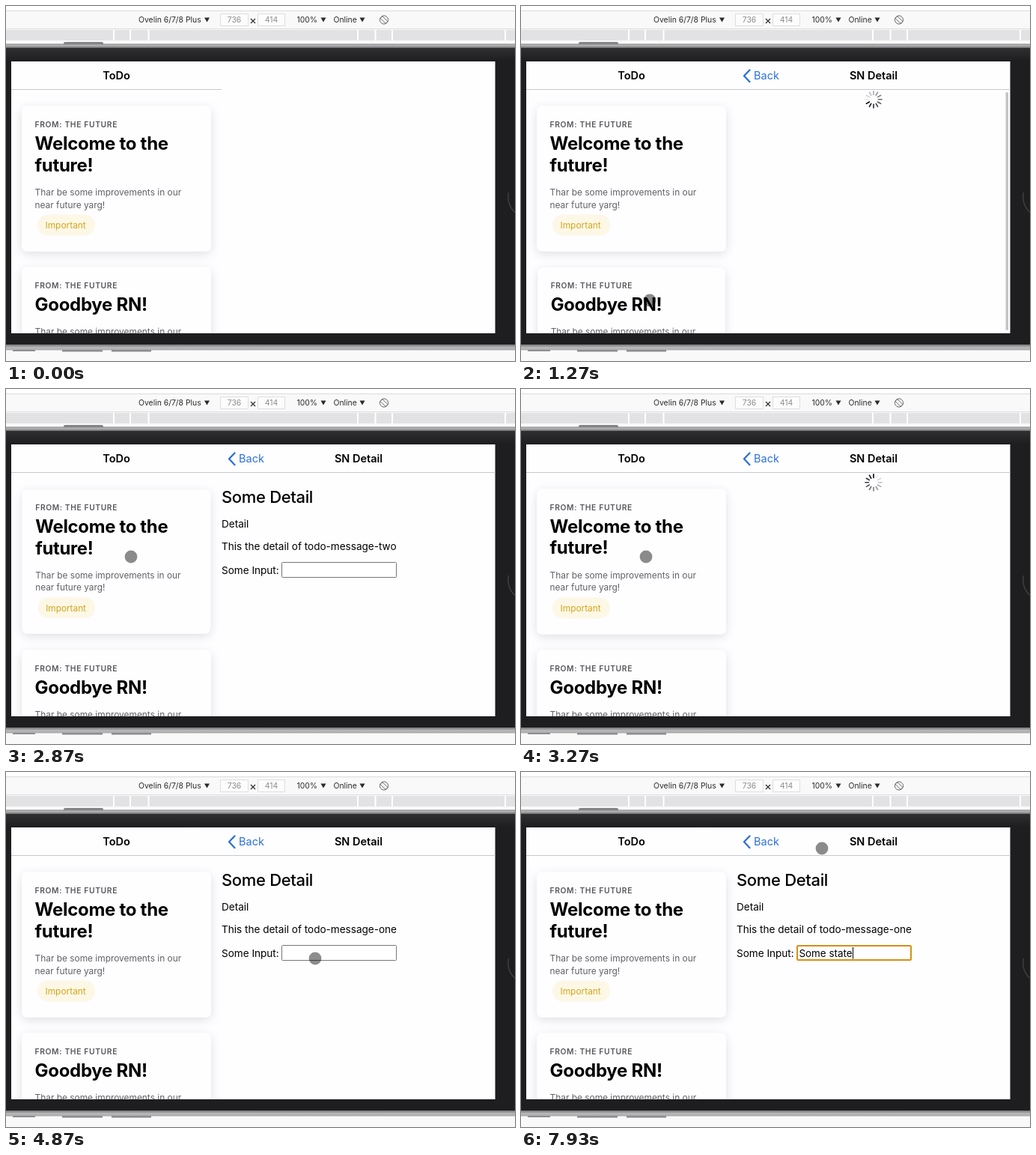
These frames come from a looping animation (680 px wide and 474 px high, 8 s). An HTML page:

```html
<!DOCTYPE html>
<html lang="en">
<head>
<meta charset="utf-8">
<title>ToDo split view</title>
<style>
html, body { margin: 0; width: 100%; height: 100%; overflow: hidden; background: #f9f9f9; }
svg { display: block; width: 680px; height: 474px; }
text { font-family: Inter, Roboto, sans-serif; font-optical-sizing: none; white-space: pre; }
.bar { font-size: 10.4px; fill: #2b2b2b; }
.dim { fill: #8c8c8c; text-anchor: middle; }
.nav { font-size: 14.5px; font-weight: 600; text-anchor: middle; }
.back { font-size: 14.5px; fill: #2b70dc; }
.from { font-size: 10.3px; font-weight: 600; letter-spacing: .64px; fill: #57575a; }
.title { font-size: 24px; font-weight: 700; letter-spacing: -.28px; }
.body { font-size: 11.9px; fill: #626264; }
.chip { font-size: 11.9px; fill: #d3a51d; }
.head { font-size: 22px; font-weight: 500; letter-spacing: -.34px; }
.copy { font-size: 13.55px; }
.typed { font-size: 13.4px; }
</style>
</head>
<body>
<svg viewBox="0 0 680 474">
  <defs>
    <filter id="shadow" x="-20%" y="-20%" width="140%" height="145%">
      <feDropShadow dx="0" dy="3.5" stdDeviation="6.5" flood-opacity=".12"/>
    </filter>
    <linearGradient id="topEdge" x2="0" y2="1">
      <stop offset="0" stop-color="#858587"/><stop offset=".4" stop-color="#b4b4b6"/><stop offset="1" stop-color="#808082"/>
    </linearGradient>
    <linearGradient id="bezel" x2="0" y2="1">
      <stop offset="0" stop-color="#303032"/><stop offset=".045" stop-color="#1e1e20"/><stop offset="1" stop-color="#1e1e20"/>
    </linearGradient>
    <linearGradient id="bottomEdge" x2="0" y2="1">
      <stop offset="0" stop-color="#78787a"/><stop offset=".5" stop-color="#bcbcbe"/><stop offset="1" stop-color="#a4a4a6"/>
    </linearGradient>
    <clipPath id="screen"><rect x="7" y="74" width="646.5" height="363"/></clipPath>
  </defs>

  <rect width="680" height="474" fill="#f9f9f9"/>
  <rect width="680" height="6" fill="#fff"/>
  <path d="M0 6.5H680M0 30.5H680" stroke="#dcdcdc"/>
  <g class="bar">
    <text x="177" y="22">Ovelin 6/7/8 Plus</text>
    <text x="388.5" y="22">100%</text>
    <text x="437.5" y="22">Online</text>
    <path d="M265 15.5h7l-3.5 6zM420.5 15.5h7l-3.5 6zM472.5 15.5h7l-3.5 6z"/>
    <path d="M286.5 10.5h37v16h-37zM336.5 10.5h36v16h-36z" fill="#fcfcfc" stroke="#dedede"/>
    <text class="dim" x="305" y="22">736</text>
    <text class="dim" x="354.5" y="22">414</text>
    <path d="M327 17l6 6m0-6l-6 6" stroke="#333" stroke-width="1.3"/>
  </g>
  <g transform="translate(505 18.5) rotate(-45)" fill="#f9f9f9" stroke="#606060" stroke-width=".9">
    <circle r="5.6"/>
    <rect x="-2" y="-5" width="4" height="10" rx="1"/>
  </g>
  <rect y="32" width="680" height="14" fill="#e2e2e4"/>
  <path d="M144 32v14M166 32v14M190.5 32v14M470 32v14M493.5 32v14M516 32v14M667 32v14" stroke="#fff" stroke-width="2"/>

  <path d="M77 51v-1q0-2 2-2h49q2 0 2 2v1zM9 459h30v2h-30zM75 459h54v2.5h-54zM141 459h53v2.5h-53z" fill="#858587"/>
  <rect y="50.5" width="680" height="5" fill="url(#topEdge)"/>
  <rect y="55.5" width="680" height="397" fill="url(#bezel)"/>
  <rect y="452.5" width="680" height="7" fill="url(#bottomEdge)"/>
  <path d="M671.5 249A27 27 0 0 0 680 275.5" fill="none" stroke="#434345" stroke-width="1.3"/>
  <rect x="7" y="74" width="646.5" height="363" fill="#fefdff"/>

  <g clip-path="url(#screen)">
    <path id="rule" stroke="#c9c9cc"/>
    <text class="nav" x="147.5" y="98.3">ToDo</text>

    <g id="card1">
      <rect x="21" y="133.5" width="253" height="194" rx="7" fill="#fefdff" filter="url(#shadow)"/>
      <text class="from" x="38.5" y="161.5">FROM: THE FUTURE</text>
      <text class="title" x="38.5" y="191.5">Welcome to the</text>
      <text class="title" x="38.5" y="220.5">future!</text>
      <text class="body" x="38.5" y="253">Thar be some improvements in our</text>
      <text class="body" x="38.5" y="269.5">near future yarg!</text>
      <rect x="42" y="278.5" width="77" height="28" rx="14" fill="#fdf8e6"/>
      <text class="chip" x="52.5" y="297">Important</text>
    </g>
    <g id="card2">
      <rect x="21" y="348.5" width="253" height="194" rx="7" fill="#fefdff" filter="url(#shadow)"/>
      <text class="from" x="38.5" y="376.5">FROM: THE FUTURE</text>
      <text class="title" x="38.5" y="406.5">Goodbye RN!</text>
      <text class="body" x="38.5" y="439">Thar be some improvements in our</text>
    </g>

    <g id="header">
      <path d="M305.5 85.5L298 93.3L305.5 101.2" fill="none" stroke="#2b70dc" stroke-width="2.3" stroke-linecap="round" stroke-linejoin="round"/>
      <text class="back" x="311" y="98.3">Back</text>
      <text class="nav" x="471" y="98.3">SN Detail</text>
    </g>
    <rect id="scrollbar" x="647.5" y="115" width="3.5" height="318" rx="1.7" fill="#c4c4c6"/>
    <g id="spinner" transform="translate(471 124.8)" stroke="#000" stroke-width="1.6" stroke-linecap="round"></g>

    <g id="detail">
      <text class="head" x="288" y="152">Some Detail</text>
      <text class="copy" x="288" y="184.5">Detail</text>
      <text class="copy" id="message" x="288" y="214.5"></text>
      <text class="copy" x="288" y="247">Some Input:</text>
      <rect id="field" fill="#fff"/>
      <text class="typed" id="typed" x="371.5" y="247"></text>
      <path id="caret" stroke="#000"/>
    </g>
  </g>
  <circle id="pointer" r="8.4" fill="#000" fill-opacity=".45"/>
</svg>

<script>
const LOOP = 8000;
const $ = id => document.getElementById(id);
const show = (id, on) => $(id).style.display = on ? '' : 'none';
const set = (el, attrs) => { for (const k in attrs) el.setAttribute(k, attrs[k]); };
const clamp = v => Math.min(1, Math.max(0, v));
const easeInOut = p => p * p * (3 - 2 * p);
const easeOut = p => 1 - (1 - p) ** 4;

// [time, x, y]
const path = [
  [300, 234, 444], [800, 172, 393], [1660, 172, 393], [2060, 167, 224],
  [3650, 167, 224], [4350, 405, 252], [4800, 413, 249], [7300, 413, 249], [7930, 402, 102]
];
// [visible from, visible until, time at which the bottom line is darkest]
const loading = [[1180, 2070, 603], [3020, 4400, 3270]];
// [down, up, vertical centre]
const presses = { card1: [2850, 3000, 230.5], card2: [1040, 1180, 445.5] };
const FOCUS = 5400, TYPE = 5990, KEY = 105, TEXT = 'Some state', BLINK = 480;

const lines = Array.from({ length: 12 }, (_, i) => {
  const line = document.createElementNS('http://www.w3.org/2000/svg', 'line');
  set(line, { y1: 6.4, y2: 11.1, transform: `rotate(${i * 30})` });
  return $('spinner').appendChild(line);
});

function pointerAt(t) {
  const i = path.findIndex(k => k[0] > t);
  if (i < 0) return path[path.length - 1].slice(1);
  if (i === 0) return path[0].slice(1);
  const [a, b] = [path[i - 1], path[i]];
  const p = easeInOut((t - a[0]) / (b[0] - a[0]));
  return [a[1] + (b[1] - a[1]) * p, a[2] + (b[2] - a[2]) * p];
}

function pressCard(id, t) {
  const [down, up, cy] = presses[id];
  const depth = t < up ? easeOut(clamp((t - down) / 300)) : 1 - easeOut(clamp((t - up) / 420));
  const s = 1 - .028 * depth;
  set($(id), { transform: `translate(147.5 ${cy}) scale(${s}) translate(-147.5 ${-cy})` });
}

function drawInput(t) {
  const focused = t >= FOCUS;
  const count = Math.min(TEXT.length, Math.max(0, Math.floor((t - TYPE) / KEY) + 1));
  const lastKey = count ? TYPE + (count - 1) * KEY : FOCUS;
  $('typed').textContent = TEXT.slice(0, count);
  set($('field'), focused
    ? { x: 369, y: 232, width: 152, height: 19, rx: 1.5, stroke: '#d58f14', 'stroke-width': 2 }
    : { x: 368.5, y: 231.5, width: 153, height: 20, rx: 1, stroke: '#777', 'stroke-width': 1 });
  const x = Math.round(371.5 + (count ? $('typed').getComputedTextLength() : 0)) + .5;
  set($('caret'), { d: `M${x} 234V249.5` });
  show('caret', focused && Math.floor((t - lastKey) / BLINK) % 2 === 0);
}

function draw(t) {
  const [first, second] = loading;
  const opened = t >= first[0];
  const load = loading.find(l => t >= l[0] && t < l[1]);
  set($('rule'), { d: `M7 111.5H${opened ? 654 : 288}` });
  show('header', opened);
  show('spinner', load);
  show('detail', opened && !load);
  $('scrollbar').style.opacity = opened ? 1 - clamp((t - 1500) / 220) : 0;
  $('message').textContent = 'This the detail of todo-message-' + (t < second[0] ? 'two' : 'one');

  if (load) lines.forEach((line, i) => {
    const age = ((t - load[2]) / 1000 - i / 12 + 10.5) % 1;
    line.style.opacity = 1 - age;
  });

  pressCard('card1', t);
  pressCard('card2', t);
  drawInput(t);

  const [cx, cy] = pointerAt(t);
  set($('pointer'), { cx, cy });
  show('pointer', t >= path[0][0] && (t < TYPE || t >= 7300));
}

const start = performance.now();
function tick() {
  draw((performance.now() - start) % LOOP);
  requestAnimationFrame(tick);
}
tick();
</script>
</body>
</html>
```
